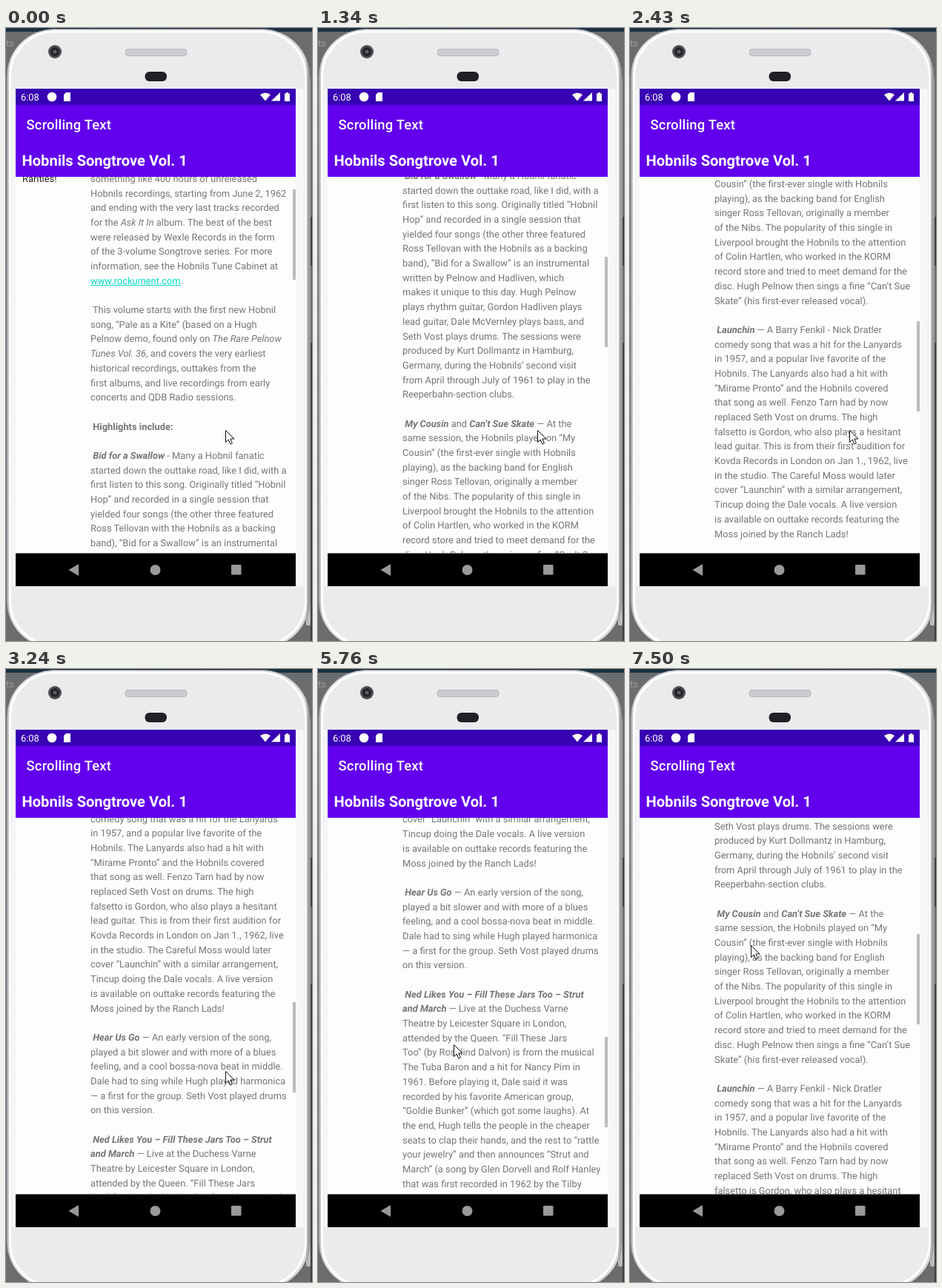
Write an HTML page that moves like this. It is 413x828 px and loops after 8 s.

```html
<!DOCTYPE html>
<html lang="en">
<head>
<meta charset="utf-8">
<title>Scrolling Text</title>
<style>
  html, body { margin: 0; width: 100%; height: 100%; overflow: hidden; }
  body { position: relative; text-rendering: geometricPrecision; font-family: Roboto, sans-serif; }
  svg { position: absolute; left: 0; top: 0; font-family: Roboto, sans-serif; }
  #page { position: absolute; left: 13px; top: 201px; width: 378px; height: 508px; overflow: hidden; background: #fdfdfd; }
  #content { position: absolute; left: 0; top: -6.1px; }
  pre, #note { position: absolute; margin: 0; white-space: pre; font: 12.87px/19.68px Roboto, sans-serif; }
  pre { left: 101px; color: #757575; }
  #note { left: 9px; color: #222; }
  em { font-weight: 700; }
  u { color: #03dac5; }
  #thumb { position: absolute; right: 0; top: 17px; width: 4px; height: 122px; background: #bcbcbc; }
</style>
</head>
<body>
<svg width="413" height="828">
  <defs>
    <linearGradient id="rim">
      <stop offset="0" stop-color="#a9abae"/><stop offset=".012" stop-color="#e4e5e7"/>
      <stop offset=".985" stop-color="#d9dadd"/><stop offset="1" stop-color="#8e9093"/>
    </linearGradient>
  </defs>
  <rect width="413" height="828" fill="#6b6c6e"/>
  <rect width="413" height="5" fill="#1b3042"/>
  <text y="25" font-size="13" fill="#9a9c9e">ts</text>
  <path d="M411 255h2v66h-2zM411 425h2v403h-2z" fill="#3c3e40"/>
  <rect x="405" y="67" width="6" height="740" rx="2" fill="#b9bbbd"/>
  <rect x="1" y="1.5" width="409" height="836" rx="64" fill="url(#rim)" stroke="#8b8d90"/>
  <rect x="5.5" y="5" width="399" height="829" rx="60" fill="#e9ebed" stroke="#fff" stroke-width="3"/>
  <path d="M8 82h5v672H8zM391 82h11v672h-11z" fill="#f5f6f7"/>
  <circle cx="66" cy="32" r="9" fill="#4b4d50"/>
  <circle cx="66" cy="32" r="6" fill="#222426"/>
  <circle cx="66" cy="32" r="2.5" fill="#5d6266"/>
  <rect x="161" y="28.5" width="83" height="9" rx="4" fill="#cbccd0" stroke="#b6b7ba"/>
  <rect x="187.5" y="59" width="29.5" height="13" rx="6" fill="#202124"/>
  <rect x="13" y="82" width="378" height="22" fill="#3700b3"/>
  <rect x="13" y="104" width="378" height="97" fill="#6200ee"/>
  <g fill="#fff">
    <text x="20" y="97.5" font-size="12.9">6:08</text>
    <circle cx="62" cy="93" r="6.3"/>
    <path d="M81 87h6v12h-9v-9zM343 90q7-5 14 0l-7 8.5zM370 87v11.500h-12zM378 87h3v1.500h2v10.500h-7v-10.500h2z"/>
    <text x="27.500" y="136.500" font-size="18.4" font-weight="500" letter-spacing=".2">Scrolling Text</text>
    <text x="21.500" y="186" font-size="20.1" font-weight="700">Hobnils Songtrove Vol. 1</text>
  </g>
  <rect x="13" y="709.5" width="378" height="44.5"/>
  <g fill="#999">
    <path d="M84.500 732l13.500-8v16z"/>
    <circle cx="201.500" cy="732" r="7"/>
    <rect x="304" y="725" width="13.500" height="13.500" rx="1"/>
  </g>
</svg>

<div id="page">
  <div id="content">
    <div id="note">Rarities!</div>
<pre>
something like 400 hours of unreleased
Hobnils recordings, starting from June 2, 1962
and ending with the very last tracks recorded
for the <i>Ask It In</i> album. The best of the best
were released by Wexle Records in the form
of the 3-volume Songtrove series. For more
information, see the Hobnils Tune Cabinet at
<u>www.rockument.com</u>.

 This volume starts with the first new Hobnil
song, “Pale as a Kite” (based on a Hugh
Pelnow demo, found only on <i>The Rare Pelnow
Tunes Vol. 36</i>, and covers the very earliest
historical recordings, outtakes from the
first albums, and live recordings from early
concerts and QDB Radio sessions.

 <b>Highlights include:</b>

 <em>Bid for a Swallow</em> - Many a Hobnil fanatic
started down the outtake road, like I did, with a
first listen to this song. Originally titled “Hobnil
Hop” and recorded in a single session that
yielded four songs (the other three featured
Ross Tellovan with the Hobnils as a backing
band), “Bid for a Swallow” is an instrumental
written by Pelnow and Hadliven, which
makes it unique to this day. Hugh Pelnow
plays rhythm guitar, Gordon Hadliven plays
lead guitar, Dale McVernley plays bass, and
Seth Vost plays drums. The sessions were
produced by Kurt Dollmantz in Hamburg,
Germany, during the Hobnils’ second visit
from April through July of 1961 to play in the
Reeperbahn-section clubs.

 <em>My Cousin</em> and <em>Can’t Sue Skate</em> — At the
same session, the Hobnils played on “My
Cousin” (the first-ever single with Hobnils
playing), as the backing band for English
singer Ross Tellovan, originally a member
of the Nibs. The popularity of this single in
Liverpool brought the Hobnils to the attention
of Colin Hartlen, who worked in the KORM
record store and tried to meet demand for the
disc. Hugh Pelnow then sings a fine “Can’t Sue
Skate” (his first-ever released vocal).

 <em>Launchin</em> — A Barry Fenkil - Nick Dratler
comedy song that was a hit for the Lanyards
in 1957, and a popular live favorite of the
Hobnils. The Lanyards also had a hit with
“Mirame Pronto” and the Hobnils covered
that song as well. Fenzo Tarn had by now
replaced Seth Vost on drums. The high
falsetto is Gordon, who also plays a hesitant
lead guitar. This is from their first audition for
Kovda Records in London on Jan 1., 1962, live
in the studio. The Careful Moss would later
cover “Launchin” with a similar arrangement,
Tincup doing the Dale vocals. A live version
is available on outtake records featuring the
Moss joined by the Ranch Lads!

 <em>Hear Us Go</em> — An early version of the song,
played a bit slower and with more of a blues
feeling, and a cool bossa-nova beat in middle.
Dale had to sing while Hugh played harmonica
— a first for the group. Seth Vost played drums
on this version.

 <em>Ned Likes You – Fill These Jars Too – Strut
and March</em> — Live at the Duchess Varne
Theatre by Leicester Square in London,
attended by the Queen. “Fill These Jars
Too” (by Rosalind Dalvon) is from the musical
The Tuba Baron and a hit for Nancy Pim in
1961. Before playing it, Dale said it was
recorded by his favorite American group,
“Goldie Bunker” (which got some laughs). At
the end, Hugh tells the people in the cheaper
seats to clap their hands, and the rest to “rattle
your jewelry” and then announces “Strut and
March” (a song by Glen Dorvell and Rolf Hanley
that was first recorded in 1962 by the Tilby
Brothers). A film of the performance shows
the Queen smiling at Hugh’s remark.

 <em>Spare My Turtle Again</em> — One of the lost
Hobnil songs recorded during the “Hobnils
For Hire” sessions but never released. This
song, written by Little Robin Hale, Felix Corder,
and Homer McHarnel, was a 1959 R&amp;B hit
for Little Robin Hale and covered by Tommy
Weldon before the Hobnils tried it and shelved
it for decades. The vocal is rough and loud,
with a lively guitar solo in the middle that
shows the band at its best.
</pre>
  </div>
  <div id="thumb"></div>
</div>

<svg width="413" height="828">
  <path id="cursor" d="M.5 .5v16l3.700-3.500 2.600 6 2.600-1.100-2.600-5.900h5.200z" fill="#fff" stroke="#111"/>
</svg>

<script>
const LOOP = 8000;
// start ms, steps, ms per step, first scroll, last scroll
const runs = [
  [0, 1, 270, 0, 0],
  [270, 8, 131.4, 42, 336],
  [1340, 8, 137, 378.3, 728],
  [2430, 3, 150, 741.3, 749],
  [3000, 6, 126, 858, 1400],
  [4060, 3, 150, 1358, 1172],
  [5760, 3, 135, 1162, 1155],
  [6340, 8, 144.2, 1090, 644],
  [7500, 1, 500, 582.3, 582.3],
];
const MOVE = 5760; // the pointer moves during the run starting here
const [content, thumb, cursor] = ['content', 'thumb', 'cursor'].map(id => document.getElementById(id));
const mix = (a, b, p) => a + (b - a) * p;

function draw(now) {
  const t = now % LOOP;
  const [start, steps, dt, from, to] = runs.findLast(run => t >= run[0]);
  const step = Math.min(steps - 1, Math.floor((t - start) / dt));
  const p = step / (steps - 1 || 1);
  const scroll = mix(from, to, p);

  content.style.transform = `translateY(${-scroll}px)`;
  thumb.style.transform = `translateY(${Math.round(scroll * 0.24)}px)`;
  thumb.style.opacity = t < 4890 || t >= MOVE ? 1 : t < 5010 ? 0.5 : 0;

  const q = start > MOVE ? 1 : p;
  const [x, y] = start < MOVE ? [296, 543] : [mix(183, 163, q), mix(507, 373, q)];
  cursor.setAttribute('transform', `translate(${x} ${y})`);
  requestAnimationFrame(draw);
}
requestAnimationFrame(draw);
</script>
</body>
</html>
```
